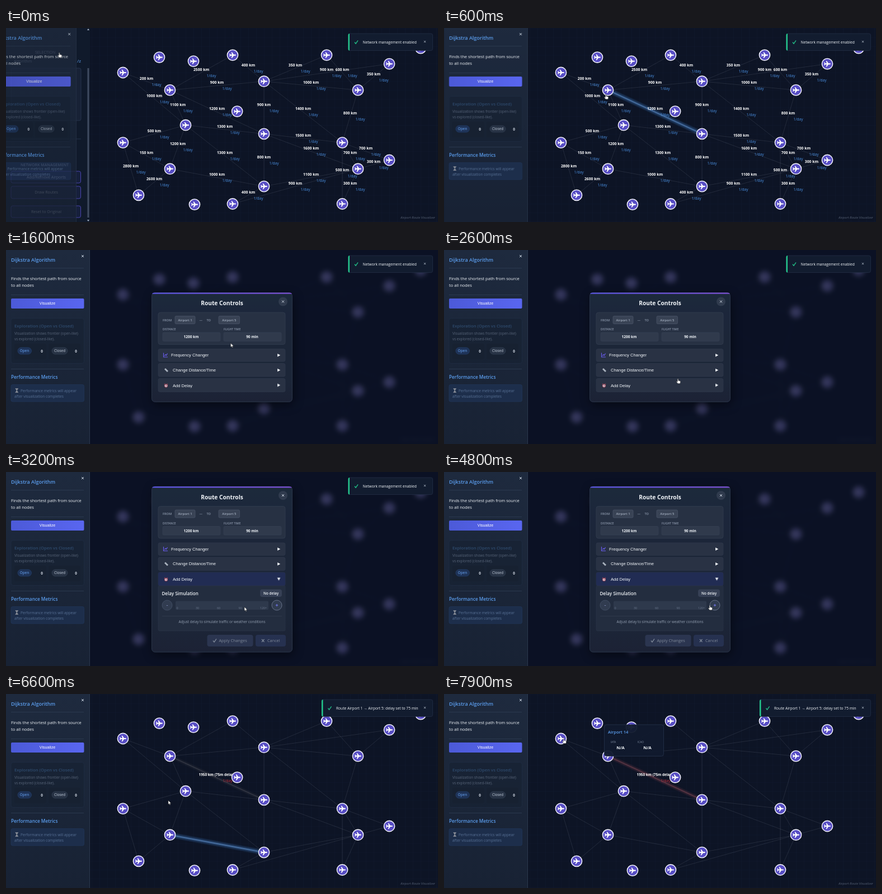
An HTML page for the animation above (8 s loop, 772 px wide and 348 px high).

```html
<!DOCTYPE html>
<html lang="en">
<head>
<meta charset="utf-8">
<title>Airport routes</title>
<style>
html, body { margin: 0; width: 100%; height: 100%; overflow: hidden; background: #0d1425; }
svg { display: block; width: 100vw; height: 100vh; font-family: "Open Sans", "Noto Sans", sans-serif; }
.b { font-weight: 700; }
.s { font-weight: 600; }
.m { text-anchor: middle; }
.ui { font-family: "Liberation Sans", Arial, sans-serif; }
.a { animation: 8s linear infinite; }

#side { animation-name: side; animation-timing-function: ease-out; }
@keyframes side {
  0% { transform: translateX(-24px); opacity: .8; }
  2.5%, 100% { transform: none; opacity: 1; }
}
#map { animation-name: soften; }
@keyframes soften {
  0%, 13% { filter: blur(0); }
  16.5%, 80.2% { filter: blur(4px); }
  81.9%, 100% { filter: blur(0); }
}
.open { animation-name: open; opacity: 0; }
@keyframes open {
  0%, 13% { opacity: 0; }
  16.5%, 80.2% { opacity: 1; }
  81.9%, 100% { opacity: 0; }
}
#lift { animation-name: lift; animation-timing-function: ease-in-out; }
@keyframes lift {
  0%, 35% { transform: translateY(50.5px); }
  39%, 100% { transform: none; }
}
.card { animation-name: grow; animation-timing-function: ease-in-out; }
@keyframes grow {
  0%, 35% { height: 196px; }
  39%, 100% { height: 297px; }
}
.body { animation-name: body; }
@keyframes body {
  0%, 35.5% { opacity: 0; }
  39%, 100% { opacity: 1; }
}
#turn { animation-name: turn; transform-origin: 487.5px 192px; }
@keyframes turn {
  0%, 35% { transform: none; }
  38%, 100% { transform: rotate(90deg); }
}
#labels { animation-name: labels; }
@keyframes labels { 0%, 17% { opacity: 1; } 17.1%, 100% { opacity: 0; } }
#late { animation-name: late; }
@keyframes late { 0%, 80% { opacity: 0; } 80.1%, 100% { opacity: 1; } }
.pulse { animation-name: pulse; }
@keyframes pulse {
  0%, 82.5% { stroke: #77706f; opacity: .6; }
  95%, 100% { stroke: #b5565f; opacity: 1; }
}
#first { animation-name: first; }
@keyframes first { 0%, 5.6% { opacity: 0; } 7%, 13% { opacity: 1; } 14.5%, 100% { opacity: 0; } }
#second { animation-name: second; }
@keyframes second { 0%, 81% { opacity: 0; } 81.9%, 82.8% { opacity: 1; } 86%, 100% { opacity: 0; } }
#toast1 { animation-name: toast1; }
@keyframes toast1 {
  0%, 52% { transform: none; opacity: 1; }
  56%, 100% { transform: translateX(165px); opacity: 0; }
}
#toast2 { animation-name: toast2; }
@keyframes toast2 {
  0%, 80.3% { transform: translateX(60px); opacity: 0; }
  82%, 100% { transform: none; opacity: 1; }
}
#tip { animation-name: tip; }
@keyframes tip { 0%, 93% { opacity: 0; } 95%, 100% { opacity: 1; } }
#cursor { animation-name: move; }
@keyframes move {
  0% { transform: translate(95px, 44px); }
  2.5% { transform: translate(150px, 62px); }
  6.25% { transform: translate(281px, 113px); }
  7.5% { transform: translate(289px, 119px); }
  8.75% { transform: translate(304px, 125px); }
  12.5% { transform: translate(395px, 161px); }
  20%, 22.5% { transform: translate(401.5px, 167px); }
  28.75% { transform: translate(412px, 215px); }
  33.75% { transform: translate(420px, 236px); }
  40% { transform: translate(426px, 242px); }
  45% { transform: translate(436px, 237px); }
  48.75%, 50% { transform: translate(457px, 230px); }
  53.75%, 70% { transform: translate(475px, 239px); }
  75%, 80% { transform: translate(402px, 299px); }
  82.5% { transform: translate(290px, 191px); }
  91.25% { transform: translate(207px, 83px); }
  93%, 100% { transform: translate(214px, 80px); }
}
#hand { animation-name: hand; animation-timing-function: step-end; }
#arrow { animation-name: arrow; animation-timing-function: step-end; }
@keyframes hand {
  0% { opacity: 1; } 1.5% { opacity: 0; } 6% { opacity: 1; } 14% { opacity: 0; }
  25% { opacity: 1; } 36% { opacity: 0; } 52.5% { opacity: 1; } 71% { opacity: 0; }
  74% { opacity: 1; } 82.3% { opacity: 0; } 91% { opacity: 1; }
  100% { opacity: 1; }
}
@keyframes arrow {
  0% { opacity: 0; } 1.5% { opacity: 1; } 6% { opacity: 0; } 14% { opacity: 1; }
  25% { opacity: 0; } 36% { opacity: 1; } 52.5% { opacity: 0; } 71% { opacity: 1; }
  74% { opacity: 0; } 82.3% { opacity: 1; } 91% { opacity: 0; }
  100% { opacity: 0; }
}
#apply rect { fill: #2b3550; }
#cancel rect { fill: #263150; }
#apply, #cancel { color: #7f8999; }
.live #apply rect { fill: #5b5bea; }
.live #cancel rect { fill: #3a465c; }
.live #apply, .live #cancel { color: #f1f5f9; }
.live #minus { stroke: #6c78a8; }
</style>
</head>
<body>
<svg viewBox="0 0 772 348" preserveAspectRatio="none">
  <defs>
    <linearGradient id="sideFill" x2="0" y2="1"><stop stop-color="#1e2a3e"/><stop offset="1" stop-color="#182234"/></linearGradient>
    <linearGradient id="cardFill" x2="0" y2="1"><stop stop-color="#1f293b"/><stop offset="1" stop-color="#1a2436"/></linearGradient>
    <linearGradient id="blue"><stop stop-color="#4c5ad8"/><stop offset="1" stop-color="#5966f0"/></linearGradient>
    <linearGradient id="bar"><stop stop-color="#5a55e0"/><stop offset="1" stop-color="#7a4fd0"/></linearGradient>
    <pattern id="grid" width="14" height="15.7" patternUnits="userSpaceOnUse" x="13" y="1.3"><path d="M0 0H14M0 0V15.7" stroke="#5b78b8" stroke-opacity=".07"/></pattern>
    <filter id="glow" x="-20%" y="-50%" width="140%" height="200%"><feGaussianBlur stdDeviation="1.2"/></filter>
    <filter id="shade" x="-20%" y="-20%" width="140%" height="140%"><feDropShadow dy="5" stdDeviation="9" flood-color="#000" flood-opacity=".45"/></filter>
    <g id="plane">
      <circle r="9.6" fill="#574dc4" stroke="#ececf8" stroke-width="1.6"/>
      <path fill="#fff" d="M6 0Q6-1.1 4.8-1.1H2L-1-5.2H-2.4L-1-1.1H-3.6L-4.9-2.7H-6L-5.2 0-6 2.7H-4.9L-3.6 1.1H-1L-2.4 5.2H-1L2 1.1H4.8Q6 1.1 6 0Z"/>
    </g>
    <path id="x" d="M-2-2 2 2M2-2-2 2" fill="none" stroke="#cbd5e1"/>
    <path id="tick" d="M-3 0-1 2.6 3-3.2" fill="none" stroke-width="1.3"/>
    <path id="play" d="M-2.4-2.8 2.8 0-2.4 2.8Z" fill="#f1f5f9"/>
  </defs>

  <rect width="772" height="348" fill="#0d1425"/>
  <g id="map" class="a">
    <rect x="150" width="622" height="348" fill="url(#grid)"/>
    <g id="edges" stroke="#c8d2e6" stroke-opacity=".15" stroke-width=".8"></g>
    <g id="first" class="a hl"></g>
    <g id="second" class="a hl"></g>
    <g id="labels" class="a m" font-size="6.8"></g>
    <g id="late" class="a">
      <path class="a pulse" d="M293 111.4 461 190" stroke-width="6" stroke-opacity=".22" filter="url(#glow)"/>
      <path class="a pulse" d="M293 111.4 461 190" stroke-width="1.6" stroke-opacity=".25"/>
      <text class="b" x="344.5" y="147.3" font-size="6.4" fill="#fff">1950 km (75m delay)</text>
      <text class="m" x="396" y="158.3" font-size="6.6" fill="#c62f3c">1/day</text>
    </g>
    <g id="nodes"></g>
    <text x="767" y="341.5" font-size="6" font-style="italic" text-anchor="end" fill="#566174">Airport Route Visualizer</text>
  </g>
  <rect class="a open" x="150" width="622" height="348" fill="#0b1024" fill-opacity=".7"/>

  <g id="under" font-size="7" fill="#a3b0c4">
    <rect width="150" height="348" fill="#101a2b"/>
    <path d="M147 72V340" stroke="#3f4b60" stroke-width="3"/>
    <path d="M145 4 147 1 149 4ZM145 344 147 347 149 344Z"/>
    <g fill="#182236" stroke="#25324a"><rect x="9" y="72" width="125" height="94" rx="3"/><path d="M9 199H134"/></g>
    <text x="52" y="46">SELECTION</text>
    <text x="14" y="62">Algorithm</text>
    <text x="134" y="62" font-size="8" text-anchor="end" fill="#60a5fa">/z</text>
    <text class="s" x="26" y="248">NETWORK MANAGEMENT</text>
    <g fill="#161f3c" stroke="#4a45b0"><rect x="9" y="257" width="124.500" height="21" rx="3"/><rect x="9" y="284" width="124.500" height="22" rx="3"/><rect x="9" y="319" width="124.500" height="21" rx="3"/></g>
    <g class="m" fill="#d5dcea"><text x="72" y="270">Add/Remove Airports</text><text x="72" y="297">Draw Routes</text><text x="72" y="332">Reset to Original</text></g>
  </g>

  <g id="side" class="a">
    <path d="M0 0H150V348H0Z" fill="url(#sideFill)"/>
    <path d="M149.500 0V348" stroke="#2b384d"/>
    <use href="#x" x="137" y="11"/>
    <path d="M9 32.500H139M9 80.500H139M9 213.500H139" stroke="#2b394f"/>
    <g class="s" fill="#5c9ff0">
      <text x="9" y="20.800" font-size="9">Dijkstra Algorithm</text>
      <text x="9" y="231" font-size="8.250">Performance Metrics</text>
      <text x="15" y="138.700" font-size="7.700" fill="#426c9f">Exploration (Open vs Closed)</text>
    </g>
    <g font-size="7.550" fill="#f1f5f9"><text x="9" y="54">Finds the shortest path from source</text><text x="9" y="66">to all nodes</text></g>
    <rect x="9" y="87" width="130.500" height="18" rx="2" fill="url(#blue)"/>
    <text class="ui m" x="74" y="98.400" font-size="7.100" fill="#fff">Visualize</text>
    <rect x="9" y="122.500" width="130.500" height="81" rx="4" fill="#16202f" fill-opacity=".45" stroke="#233047" stroke-width=".6"/>
    <g font-size="6.350" fill="#586579"><text x="15" y="151.800">Visualization shows frontier (open-like)</text><text x="15" y="161.800">vs explored (closed-like).</text></g>
    <g fill="#172131"><rect x="15" y="168" width="56.500" height="28" rx="3"/><rect x="76" y="168" width="57" height="28" rx="3"/></g>
    <rect x="21" y="175" width="24.500" height="12" rx="6" fill="#1e3256" stroke="#284574" stroke-width=".6"/>
    <rect x="82" y="175" width="28" height="12" rx="6" fill="#273244" stroke="#364358" stroke-width=".6"/>
    <g class="s m" font-size="6.300"><text x="33" y="183.300" fill="#5a8fd6">Open</text><text x="96" y="183.300" fill="#a3aebd">Closed</text><g class="b" fill="#dbe2ec"><text x="64" y="183.500">0</text><text x="125" y="183.500">0</text></g></g>
    <rect x="9" y="241.500" width="130.500" height="30.500" rx="3" fill="#1d2e4b" stroke="#223a60" stroke-width=".6"/>
    <path d="M16.500 248.500h5.500M16.500 255.500h5.500M17.300 249 21.200 255H17.300L21.200 249Z" fill="#8a8f98" stroke="#8a8f98" stroke-width=".8"/>
    <g font-size="6.600" fill="#587195"><text x="26" y="254.500">Performance metrics will appear</text><text x="15" y="265">after visualization completes</text></g>
  </g>

  <g class="a open">
    <g id="lift" class="a">
      <rect class="a card" x="260.500" y="26" width="251" height="297" rx="6" fill="url(#cardFill)" stroke="#303b50" stroke-width=".8" filter="url(#shade)"/>
      <path d="M261 28.300Q262 26 266 26H506Q510 26 511 28.300Z" fill="url(#bar)"/>
      <text class="b m" x="386" y="48.800" font-size="10.200" fill="#f1f5f9">Route Controls</text>
      <circle cx="495" cy="42" r="8" fill="#303b4e"/><use href="#x" x="495" y="42"/>
      <rect x="272" y="61.500" width="227" height="57.500" rx="4" fill="#273143" stroke="#343f52" stroke-width=".7"/>
      <g class="s" fill="#8d99ac" font-size="5.600">
        <text x="280" y="77.300">FROM</text><text x="358.500" y="77.300">TO</text><text x="345.500" y="77">—</text>
        <g font-size="5"><text x="280" y="93.500">DISTANCE</text><text x="389" y="93.500">FLIGHT TIME</text></g>
      </g>
      <g fill="#394355" stroke="#4c576b" stroke-width=".7"><rect x="302" y="68" width="36" height="14" rx="2"/><rect x="380" y="68" width="37.500" height="14" rx="2"/></g>
      <g class="s m" font-size="5.900" fill="#a2adbe"><text x="320" y="77.200">Airport 1</text><text x="398.800" y="77.200">Airport 5</text></g>
      <g fill="#303a4c" stroke="#3a4558" stroke-width=".5"><rect x="280" y="97.500" width="103" height="15.500" rx="2"/><rect x="389" y="97.500" width="103" height="15.500" rx="2"/></g>
      <g class="b m" font-size="6.500" fill="#f1f5f9"><text x="331" y="107.500">1200 km</text><text id="time" x="440" y="107.500">90 min</text></g>
      <g fill="#293244" stroke="#323c50" stroke-width=".6"><rect x="272" y="127" width="227" height="22.500" rx="3"/><rect x="272" y="153" width="227" height="23.500" rx="3"/><rect x="272" y="180" width="227" height="24" rx="3"/></g>
      <rect class="a body" x="272" y="180" width="227" height="24" rx="3" fill="#212c53"/>
      <g class="ui" font-size="7.600" fill="#f1f5f9"><text x="295" y="140.500">Frequency Changer</text><text x="298" y="167.300">Change Distance/Time</text><text x="298" y="195">Add Delay</text></g>
      <path d="M281.500 134V141.500H289M283 139.500 285 137 286.500 138.500 288.500 135" fill="none" stroke="#6a5df0" stroke-width="1.100"/>
      <path d="M283 163.500 285 161.500 290 166.500 288 168.500Z" fill="#a9b2be"/>
      <circle cx="286" cy="193" r="2.700" fill="#c9ced8" stroke="#b0475a"/><path d="M282.700 190.500 284.300 189.200M289.300 190.500 287.700 189.200M286 191.300V193H287.300" stroke="#b0475a" fill="none"/>
      <use href="#play" x="487.500" y="138.300"/><use href="#play" x="487.500" y="165"/>
      <g id="turn" class="a"><use href="#play" x="487.500" y="192"/></g>

      <g class="a body">
        <rect x="272" y="204" width="227" height="81" rx="2" fill="#232d3f" stroke="#2c374a" stroke-width=".6"/>
        <text class="s" x="278.500" y="220.500" font-size="8" fill="#f1f5f9">Delay Simulation</text>
        <rect x="454" y="210.500" width="39" height="13.500" rx="4" fill="#364055"/>
        <text id="badge" class="s m" x="473.500" y="219.500" font-size="6.400" fill="#f1f5f9">No delay</text>
        <g fill="#313c50" stroke-width=".8"><circle id="minus" cx="288" cy="239" r="9" stroke="#47536a"/><circle cx="484" cy="239" r="9" stroke="#778198"/></g>
        <path d="M286.800 239.500H289.200" stroke="#7a83b0"/><path d="M481.800 239H486.200M484 236.800V241.200" stroke="#7479ee"/>
        <rect x="303" y="231.500" width="166" height="15.500" rx="2" fill="#2e394c"/>
        <rect id="fill" x="303" y="231.500" width="0" height="15.500" rx="2" fill="#5b5bea"/>
        <g class="m" font-size="5.400" fill="#69758b"><text x="306" y="246">0</text><text x="342" y="246">30</text><text x="380" y="246">60</text><text x="418.500" y="246">90</text><text x="460" y="246">120+</text></g>
        <path d="M279 258.500H493" stroke="#313c4f" stroke-width=".8"/>
        <text class="m" x="386" y="271" font-size="6.300" fill="#94a0b2">Adjust delay to simulate traffic or weather conditions</text>
        <g font-size="7.300" stroke-width="0">
          <g id="apply"><rect x="359.500" y="292" width="82" height="21" rx="4"/><use href="#tick" x="373" y="302.500" stroke="currentColor"/><text x="380.500" y="305.200" fill="currentColor">Apply Changes</text></g>
          <g id="cancel"><rect x="446" y="292" width="54" height="21" rx="4"/><path d="M457 300 461.500 305M461.500 300 457 305" stroke="currentColor" stroke-width="1.200"/><text x="467" y="305.200" fill="currentColor">Cancel</text></g>
        </g>
      </g>
    </g>
  </g>

  <g id="toast1" class="a"></g>
  <g id="toast2" class="a"></g>

  <g id="tip" class="a">
    <rect x="286.500" y="55" width="106" height="56.500" rx="4" fill="#111b2e" fill-opacity=".96" stroke="#26344c" stroke-width=".8"/>
    <text class="s" x="293" y="71" font-size="7.500" fill="#5c9ff0">Airport 14</text>
    <g font-size="4.700" fill="#8390a5"><text x="298" y="88">IATA</text><text x="346" y="88">ICAO</text></g>
    <g class="b m" font-size="7.600" fill="#f1f5f9"><text x="315.500" y="98.500">N/A</text><text x="363.500" y="98.500">N/A</text></g>
  </g>

  <g id="cursor" class="a" fill="#fff" stroke="#111" stroke-width=".5">
    <path id="arrow" class="a" d="M0 0V7.200L1.700 5.700 2.800 8.200 4 7.700 2.900 5.200H5.200Z"/>
    <path id="hand" class="a" d="M-.8.600Q0-.500.800.600V3.300L4 4.200Q4.800 4.500 4.600 5.500L4 8.800H-.200L-2.800 5.600Q-2.600 4.500-1.600 5L-.8 5.600Z"/>
  </g>
</svg>
<script>
const $ = id => document.getElementById(id);

// Airports sit on a lattice: columns of 28 px, rows of 15.7 px
const airports = {
  A: [2, 4], B: [5, 6], E: [9, 2], F: [11, 5], G: [15, 2], H: [17, 6], I: [19, 3], J: [21, 1.2],
  K: [6, 10], M: [11, 11], N: [16, 12], O: [19, 14], P: [17, 15], Q: [11, 17], R: [9, 19],
  S: [16, 19], U: [3, 18], V: [5, 15], W: [2, 12],
  C: [4.32, 2.25], D: [6.5, 2.7], L: [9.29, 8.43], T: [6.57, 19.07]
};
const at = k => [153 + 28 * airports[k][0], 17.2 + 15.7 * airports[k][1]];

const routes = `AB200 AK1000 BE2500 BF900 EF400 FG350 FI900 GH600 FH1000 HI350 BK1100 BM1200
  FM900 FN1400 HN800 KM1300 MN1500 MP1600 WK500 KV1200 WV150 KQ1300 MQ800 NO700 NP700
  PO300 WU2800 VU2600 VQ1000 QR400 QP1100 RP900 NS500 PS300`.split(/\s+/);

const line = (a, b) => `M${at(a)}L${at(b)}`;
let edges = "", labels = "";
for (const [a, b, ...km] of routes) {
  const [p, q] = [at(a), at(b)];
  const x = (p[0] + q[0]) / 2, y = (p[1] + q[1]) / 2;
  edges += `<path d="${line(a, b)}"/>`;
  labels += `<text class="b" x="${x}" y="${y - 3.2}" fill="#fff">${km.join("")} km</text>
    <text x="${x + 18}" y="${y + 7.8}" font-size="6.6" fill="#4a90e2">1/day</text>`;
}
$("edges").innerHTML = edges;
$("labels").innerHTML = labels;
$("nodes").innerHTML = Object.keys(airports).map(k => {
  const [x, y] = at(k);
  return `<use href="#plane" x="${x}" y="${y}"/>`;
}).join("");

const highlight = (id, a, b) => $(id).innerHTML =
  `<path d="${line(a, b)}" stroke="#3f7cc4" stroke-opacity=".34" stroke-width="8" filter="url(#glow)"/>
   <path d="${line(a, b)}" stroke="#6fa6e6" stroke-opacity=".4" stroke-width="2.6"/>`;
highlight("first", "B", "M");
highlight("second", "V", "Q");

const toast = (id, x, text) => $(id).innerHTML =
  `<rect x="${x}" y="10" width="${762.5 - x}" height="30.5" rx="3" fill="#121c2f" stroke="#26324a" stroke-width=".7"/>
   <path d="M${x + 2.5} 10Q${x} 10 ${x} 13V37.500Q${x} 40.500 ${x + 2.5} 40.500Z" fill="#22c58b"/>
   <use href="#tick" x="${x + 14.5}" y="25.500" stroke="#22c58b"/>
   <text x="${x + 26}" y="27.600" font-size="6.650" fill="#f1f5f9">${text}</text>
   <use href="#x" transform="translate(748.500 24.500) scale(.8)"/>`;
toast("toast1", 611.5, "Network management enabled");
toast("toast2", 564, "Route Airport 1 → Airport 5: delay set to 75 min");

// Five clicks on "+", 15 minutes each
let shown = -1;
function tick() {
  const t = performance.now() % 8000;
  const clicks = Math.max(0, Math.min(5, Math.floor((t - 4860) / 140)));
  if (clicks !== shown) {
    shown = clicks;
    const delay = clicks * 15;
    $("badge").textContent = delay ? delay + " min" : "No delay";
    $("time").textContent = 90 + delay + " min";
    $("fill").setAttribute("width", 166 * delay / 120);
    $("lift").classList.toggle("live", delay > 0);
  }
  requestAnimationFrame(tick);
}
tick();
</script>
</body>
</html>
```
